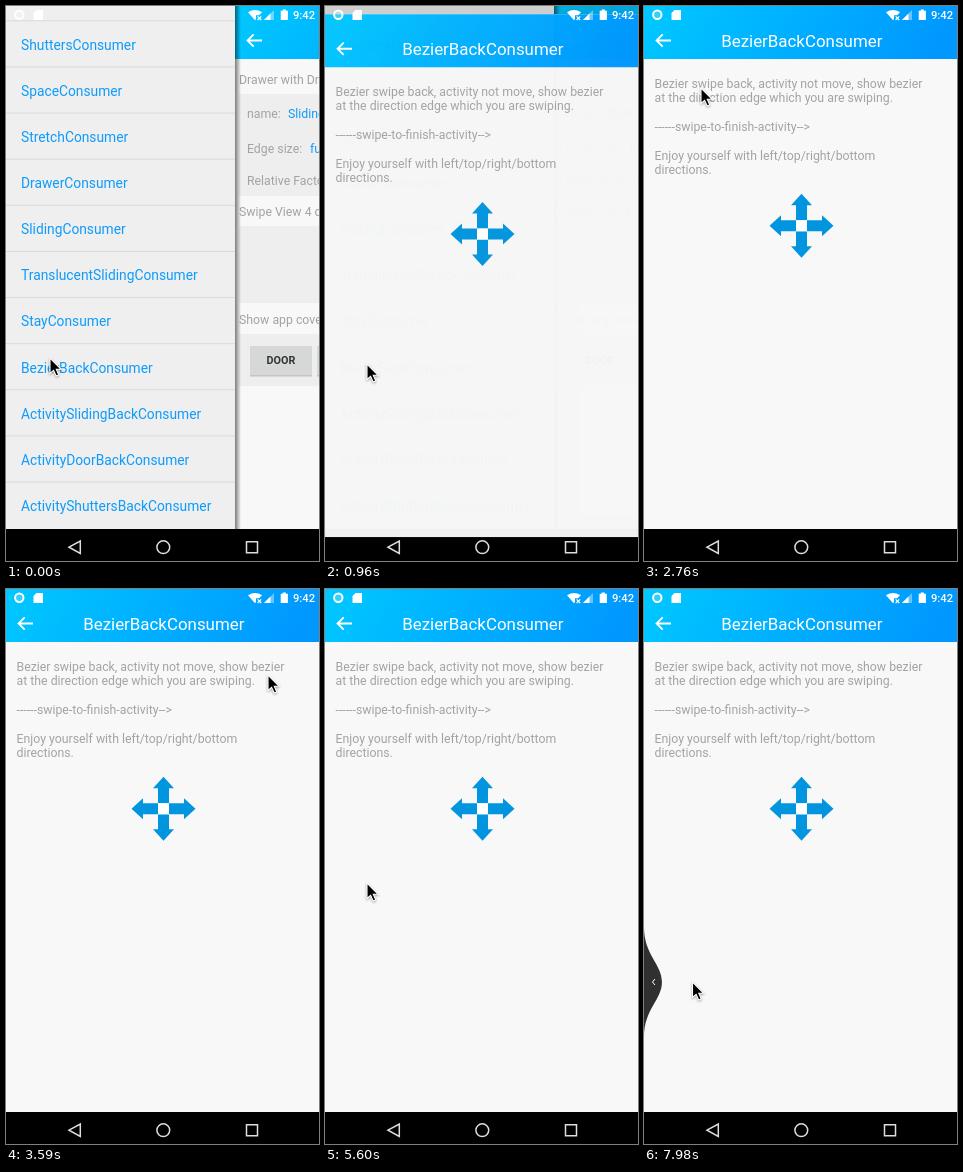
Animation, 313 px wide and 555 px high, one loop 8000 ms. Source, as an HTML page:

```html
<!DOCTYPE html>
<html lang="en">
<head>
<meta charset="utf-8">
<style>
  html, body { margin: 0; width: 100%; height: 100%; overflow: hidden; background: #000; }
  svg { display: block; width: 313px; height: 555px; font-family: Roboto, "Noto Sans", sans-serif; }
  .list { font-size: 13.8px; fill: #0e9bfb; }
  .body { font-size: 12.3px; fill: #a3a3a3; }
  .blue { fill: #0e9bfb; }
  .line { fill: none; stroke: #fff; }
  #cursor { filter: drop-shadow(0 1px 1px rgba(0, 0, 0, .35)); }
</style>
</head>
<body>
<svg viewBox="0 0 313 555">
  <defs>
    <linearGradient id="sky" x1="0" y1="0" x2="1" y2=".1">
      <stop stop-color="#00c8ff"/><stop offset="1" stop-color="#0098ff"/>
    </linearGradient>
    <linearGradient id="shade">
      <stop stop-color="#000" stop-opacity=".5"/><stop offset="1" stop-color="#000" stop-opacity="0"/>
    </linearGradient>
    <g id="window">
      <rect width="313" height="523" fill="#f8f8f8"/>
      <rect width="313" height="53" fill="url(#sky)"/>
      <path class="line" stroke-width="1.8" d="M27 34.5H12.5M18.7 28.3l-6.2 6.2 6.2 6.2"/>
    </g>
    <path id="arm" fill="#0095de" d="M0-32L10.5-20.5H5.5V-5.5H-5.5V-20.5H-10.5Z"/>
    <g id="button">
      <rect y="1.5" width="62" height="29" fill="#c4c4c4"/>
      <rect width="62" height="29" fill="#d6d7d7"/>
    </g>
  </defs>

  <g id="home">
    <g transform="translate(229)">
      <use href="#window"/>
      <g class="body">
        <text x="4" y="77.5">Drawer with DrawerConsumer</text>
        <path fill="#eee" d="M4 88H304V190H4ZM4 220H304V297H4ZM4 328H304V380H4Z"/>
        <text x="12" y="111.5">name:</text>
        <text x="53" y="111.5" class="blue">SlidingConsumer</text>
        <text x="12" y="146.7">Edge size:</text>
        <text x="75" y="146.7" class="blue">full</text>
        <text x="12" y="179">Relative Factor:</text>
        <text x="4" y="210">Swipe View 4 directions</text>
        <text x="4" y="317.5">Show app cover</text>
      </g>
      <use href="#button" x="15" y="340"/>
      <use href="#button" x="82" y="340"/>
      <text x="46" y="358.2" font-size="10.8" font-weight="700" text-anchor="middle" fill="#333">DOOR</text>
    </g>
    <rect width="229" height="523" fill="#efefef"/>
    <rect x="229" width="6" height="523" fill="url(#shade)"/>
    <g id="list" class="list"></g>
    <rect y="523" width="313" height="32"/>
  </g>

  <g id="page">
    <use href="#window"/>
    <text x="157.8" y="41" font-size="16.9" fill="#fff" text-anchor="middle">BezierBackConsumer</text>
    <g id="note" class="body"></g>
    <g transform="translate(157.5 219.8)">
      <use href="#arm"/><use href="#arm" transform="rotate(90)"/>
      <use href="#arm" transform="rotate(180)"/><use href="#arm" transform="rotate(270)"/>
      <path fill="#fff" d="M-5.5-5.5H5.5V5.5H-5.5Z"/>
    </g>
    <rect y="523" width="313" height="32"/>
  </g>

  <g fill="#fff">
    <circle cx="13.3" cy="8.8" r="4.2" fill-opacity=".2" stroke="#fff" stroke-width="2"/>
    <path d="M30.5 4H37V14H27.5V7Z"/>
    <path d="M242 6.2Q249 1.6 256 6.2L253.2 9.3H250V13L249 14.2Z"/>
    <path class="line" stroke-width="1.2" d="M251.6 10.4l3.6 3.6M255.2 10.4l-3.6 3.6"/>
    <path fill-opacity=".4" d="M268 4V14H258Z"/>
    <path d="M264.5 7.5V14H258Z"/>
    <path d="M276.7 3.5h3.2v1.2h2V14h-7.2V4.7h2Z"/>
    <text x="287" y="13.2" font-size="11.2" font-weight="500">9:42</text>
  </g>
  <g class="line" style="stroke: #ddd" stroke-width="1.5">
    <path d="M63 541.2L74.3 535V547.4ZM240.5 535.8H251.5V546.8H240.5Z"/>
    <circle cx="157.3" cy="541.2" r="6.4"/>
  </g>

  <g id="bump">
    <path id="hump" fill="#303030"/>
    <path id="hook" class="line" d="M2.5-3L0 0 2.5 3"/>
  </g>
  <path id="cursor" stroke="#fff" stroke-width="1.1" d="M0 0V15.5L3.6 12.3 6.2 18 8.7 16.9 6.3 11.3H11.2Z"/>
</svg>
<script>
const LOOP = 8000, TICKS = 67, TICK = 7980 / TICKS;   // the screen refreshes once per tick
const $ = id => document.getElementById(id);
const put = (id, name, value) => $(id).setAttribute(name, value);
const ramp = (t, from, to) => Math.min(1, Math.max(0, (t - from) / (to - from)));

const names = ["Shutters", "Space", "Stretch", "Drawer", "Sliding", "TranslucentSliding", "Stay",
  "BezierBack", "ActivitySlidingBack", "ActivityDoorBack", "ActivityShuttersBack"];
$("list").innerHTML = names.map((name, i) => {
  const y = 46.12 * i;
  return `<rect y="${14.3 + y}" width="229" height="1" fill="#dadada"/>` +
    `<text x="15" y="${43.7 + y}">${name}Consumer</text>`;
}).join("");

const note = ["Bezier swipe back, activity not move, show bezier",
  "at the direction edge which you are swiping.", "", "------swipe-to-finish-activity--&gt;", "",
  "Enjoy yourself with left/top/right/bottom", "directions."];
$("note").innerHTML = note.map((s, i) => `<text x="10.5" y="${81.6 + 14.4 * i}">${s}</text>`).join("");

// Pointer moves: first tick, last tick, then where it goes
const start = [44, 352];
const moves = [
  [0, 2, 42, 358], [10, 17, 146, 55], [18, 23, 57, 82],     // tap, then up to the text
  [24, 30, 262, 86], [30, 33, 46, 108], [33, 37, 206, 112], // along the lines
  [39, 44, 42, 294],
  [47, 53, 80, 294], [53, 56, 16, 300],                     // first drag and release
  [57, 59, 20, 361], [59, 61, 14, 393], [62, 67, 48.5, 393] // second drag
];

function pointerAt(tick) {
  let [x, y] = start;
  for (const [from, to, toX, toY] of moves) {
    const k = ramp(tick, from, to);
    x += (toX - x) * k;
    y += (toY - y) * k;
  }
  return [x, y];
}

function draw() {
  const tick = Math.floor(performance.now() % LOOP / TICK + 0.01);
  const ms = tick * 120;

  // The page slides up 8% of the height while it fades in
  put("page", "transform", `translate(0 ${44.4 * (1 - ramp(ms, 860, 1210)) ** 5})`);
  put("page", "opacity", 1 - (1 - ramp(ms, 860, 1060)) ** 5);
  put("home", "opacity", 1 - 0.3 * ramp(ms, 860, 1080));

  const [x, y] = pointerAt(tick);
  put("cursor", "transform", `translate(${x} ${y})`);

  // The edge bulges by half the distance dragged
  const [grabTick, grabX, grabY] = tick < 57 ? [47, 42, 293.5] : [62, 14, 393];
  const w = tick > grabTick ? Math.max(0, (x - grabX) * 0.52) : 0;
  put("bump", "transform", `translate(0 ${grabY})`);
  put("bump", "opacity", w > 0 ? 1 : 0);
  put("hump", "d", `M0-55C0-27 ${w}-18 ${w} 0C${w} 18 0 27 0 55Z`);
  put("hook", "transform", `translate(${w / 2 - 0.5})`);
  put("hook", "opacity", Math.min(1, w / 18));
  requestAnimationFrame(draw);
}
draw();
</script>
</body>
</html>
```
